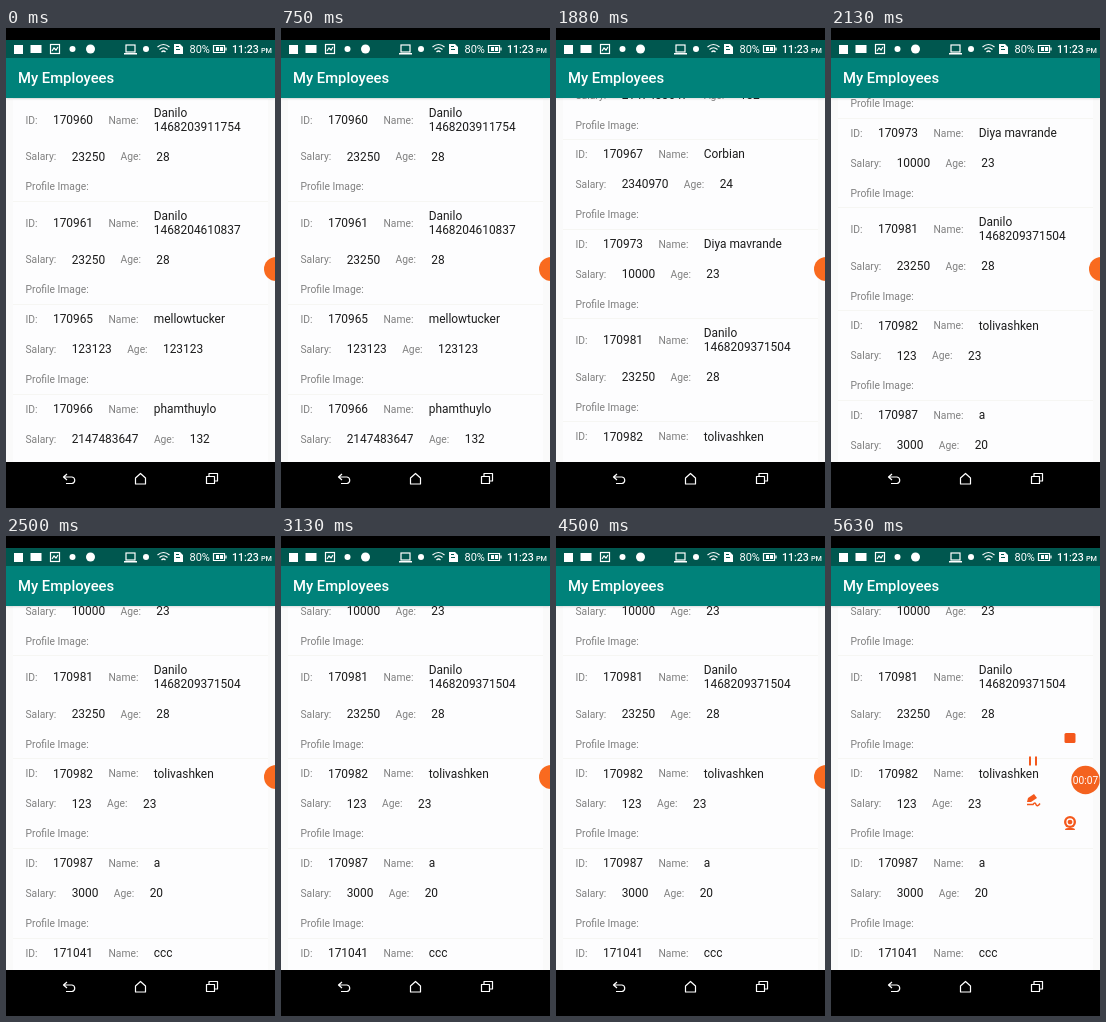
These frames come from a looping animation (269x480 px, 5760 ms). An HTML page:

```html
<!DOCTYPE html>
<html lang="en">
<head>
<meta charset="utf-8">
<title>My Employees</title>
<style>
  html, body { margin: 0; width: 100%; height: 100%; overflow: hidden; }
  body { position: relative; background: #fafafa; font-family: Roboto, sans-serif; }
  #list { position: absolute; left: 0; top: 70px; width: 269px; }
  .card {
    box-sizing: border-box; margin: 0 7px; padding: 9px 0 6.6px 12.5px;
    background: #fdfdfe; box-shadow: inset 0 1px #f6f6f3; white-space: nowrap;
  }
  .row { display: flex; align-items: center; gap: 15.4px; min-height: 14px; margin-bottom: 16px; }
  .row:last-child { margin-bottom: 0; }
  .row span { font-size: 10.3px; line-height: 14px; color: #808080; }
  .row b { font-size: 11.9px; line-height: 13.7px; font-weight: 400; color: #1c1c1c; }
  #bar {
    position: absolute; left: 0; top: 0; width: 269px; height: 70px;
    background: linear-gradient(#000 12px, #00574f 12px 30px, #00827a 30px);
    box-shadow: 0 1px 2px #0002;
  }
  #title {
    position: absolute; left: 12px; top: 40px; line-height: 20px;
    font-size: 14.8px; font-weight: 500; color: #fff; white-space: nowrap;
  }
  #nav { position: absolute; left: 0; top: 434px; width: 269px; height: 46px; background: #000; }
  svg { position: absolute; left: 0; top: 0; }
  .tool { opacity: 0; }
</style>
</head>
<body>
<div id="list"></div>
<div id="bar"><div id="title">My Employees</div></div>
<div id="nav"></div>

<svg width="269" height="480" viewBox="0 0 269 480" font-family="Roboto, sans-serif">
  <!-- status bar -->
  <g fill="#fff">
    <rect x="8" y="17" width="9" height="9"/>
    <rect x="24.500" y="17" width="11" height="8"/>
    <circle cx="66.500" cy="21" r="3"/>
    <circle cx="84.500" cy="21" r="4.500"/>
    <circle cx="140" cy="21" r="3"/>
    <path d="M118 25h13v1.500h-13zM168 16h6l3 3v7h-9z"/>
    <text x="183.500" y="25.300" font-size="11">80%</text>
    <text x="226" y="25.300" font-size="10.600" font-weight="500">11:23<tspan font-size="7.300" dx="2">PM</tspan></text>
    <path d="M210 19h3v4h-3zM214 19h3v4h-3z"/>
  </g>
  <g fill="none" stroke="#fff" stroke-width="1.200">
    <rect x="44.500" y="16.500" width="9" height="9"/>
    <path d="M46 23l2-3 2 2 2-3"/>
    <rect x="120" y="17" width="9" height="7"/>
    <path d="M151.500 19q6-5 12 0M153.500 21.500q4-3.500 8 0M155.500 24q2-2 4 0"/>
    <path d="M207.500 17.500h11v7h-11zM220 19.500v3"/>
    <path d="M170 18.500h3M170 21.500h4" stroke="#00574f"/>
  </g>

  <!-- navigation keys -->
  <g fill="none" stroke="#fff" stroke-width="1.200" stroke-linejoin="round">
    <path d="M61 446l-3.500 3 3.500 3M57.500 449h8.500a3.300 3.300 0 0 1 0 6.500h-6"/>
    <path d="M129.500 456v-6l5-4.500 5 4.500v6z"/>
    <path d="M200.500 448.500h8v7h-8zM203 448v-2.500h8.500v7.500h-2.500"/>
  </g>

  <!-- recorder -->
  <circle id="dock" cx="270" cy="241" r="12" fill="#f96a1f"/>
  <g fill="#f4581c">
    <g class="tool" data-x="239" data-y="202"><rect x="-5.500" y="-5" width="11" height="10" rx="1.500"/></g>
    <g class="tool" data-x="202" data-y="225"><path d="M-4-4.500h2v9h-2zM2-4.500h2v9h-2z"/></g>
    <g class="tool" data-x="202" data-y="264">
      <path d="M-6 2l1-4 6-4 3 4-6 4z"/>
      <path d="M-6 4.500h6q2-3 3 0t4-1" fill="none" stroke="#f4581c" stroke-width="1.500"/>
    </g>
    <g class="tool" data-x="239" data-y="287">
      <circle cy="-1" r="6"/>
      <circle cy="-1" r="3" fill="none" stroke="#fff" stroke-width="1.300"/>
      <path d="M-5 7q0-2 3-2h4q3 0 3 2z"/>
    </g>
  </g>
  <g id="timer">
    <circle cx="254.500" cy="244" r="14.200" fill="#f4621f"/>
    <text x="254.500" y="247.700" font-size="10.200" fill="#fff" text-anchor="middle">00:07</text>
  </g>
</svg>

<script>
const LOOP = 5760;
const HUB = [254.5, 244];

const people = [
  [170960, 'Danilo<br>1468203911754', 23250, 28],
  [170961, 'Danilo<br>1468204610837', 23250, 28],
  [170965, 'mellowtucker', 123123, 123123],
  [170966, 'phamthuylo', 2147483647, 132],
  [170967, 'Corbian', 2340970, 24],
  [170973, 'Diya mavrande', 10000, 23],
  [170981, 'Danilo<br>1468209371504', 23250, 28],
  [170982, 'tolivashken', 123, 23],
  [170987, 'a', 3000, 20],
  [171041, 'ccc', 1000, 22]
];

const field = (label, value) => `<span>${label}:</span><b>${value}</b>`;
const row = html => `<div class="row">${html}</div>`;

const list = document.getElementById('list');
list.innerHTML = people.map(([id, name, pay, age]) => `<div class="card">${
  row(field('ID', id) + field('Name', name)) +
  row(field('Salary', pay) + field('Age', age)) +
  row('<span>Profile Image:</span>')
}</div>`).join('');

// Each step is [time, value]; a value holds until the next step.
function play(el, steps, style) {
  const frames = steps.map(([t, v]) => ({ ...style(v), offset: t / LOOP, easing: 'steps(1, end)' }));
  frames.push({ ...style(steps[steps.length - 1][1]), offset: 1 });
  el.animate(frames, { duration: LOOP, iterations: Infinity });
}

const fade = v => ({ opacity: v });

play(list, [
  [0, 0], [1000, 32], [1130, 100], [1250, 172], [1380, 234],
  [1500, 262], [1630, 284], [1750, 312], [1880, 344],
  [2000, 395], [2130, 455], [2250, 498], [2380, 515]
], y => ({ transform: `translateY(${-y}px)` }));

play(document.getElementById('dock'), [[0, 1], [5000, 0]], fade);
play(document.getElementById('timer'), [[0, 0], [5000, 1]], fade);

for (const el of document.querySelectorAll('.tool')) {
  const dx = el.dataset.x - HUB[0], dy = el.dataset.y - HUB[1];
  play(el, [[0, 0], [5250, 0.5], [5380, 1.12], [5500, 1.04], [5630, 1]], k => ({
    opacity: k ? 1 : 0,
    transform: `translate(${HUB[0] + dx * k}px, ${HUB[1] + dy * k}px)`
  }));
}
</script>
</body>
</html>
```
